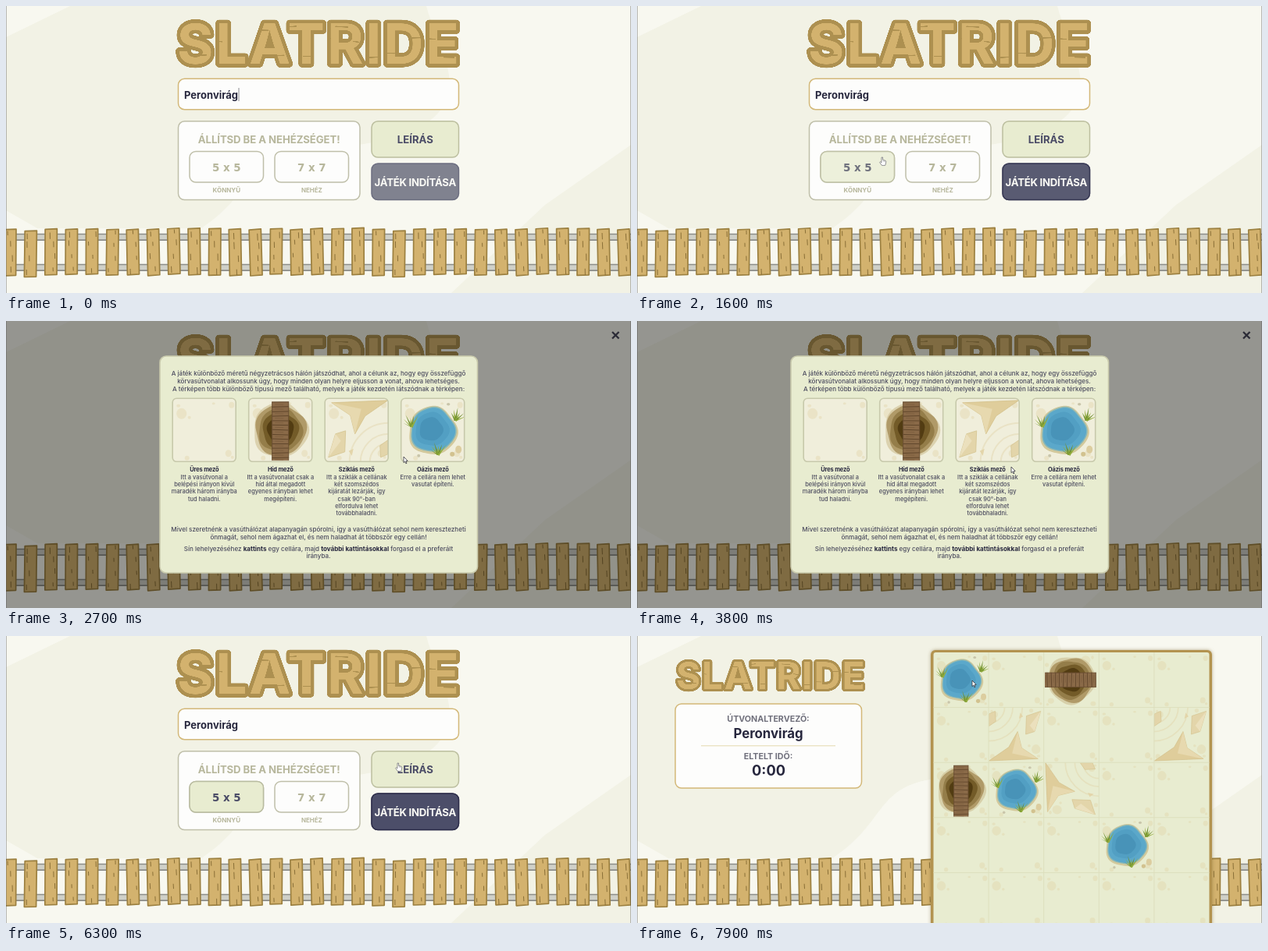
An HTML page with a canvas for the animation above (8 s loop, 800 by 368 pixels).

```html
<!DOCTYPE html>
<html lang="hu">
<head>
<meta charset="utf-8">
<title>Vasútépítő játék</title>
<style>
html, body { margin: 0; width: 100%; height: 100%; overflow: hidden; background: #f8f8f0; }
canvas { display: block; width: 100vw; height: 100vh; }
</style>
</head>
<body>
<canvas id="stage"></canvas>
<script>
const W = 800, H = 368, LOOP = 8000;
const SELECT = 1400, OPEN = 2700, CLOSE = 5400, START = 7100;
const TITLE = 'SLATRIDE', PLAYER = 'Peronvirág';
const SANS = 'Inter, "Open Sans", sans-serif';
const WIDE = '"DejaVu Sans", sans-serif';
const C = {
  light: '#f8f8f0', shade: '#f2f2e5', wood: '#d3b26e', bark: '#ad9050', rim: '#9c8040', grain: '#8a7038',
  white: '#fdfdfc', gold: '#d3b878', muted: '#b7b79c', edge: '#bfbfa9', sage: '#e8ecd0',
  navy: '#4a4b66', ink: '#26263d', body: '#4b4b5e'
};

const canvas = document.getElementById('stage');
const dpr = window.devicePixelRatio || 1;
canvas.width = W * dpr;
canvas.height = H * dpr;
const g = canvas.getContext('2d');

const ease = k => { k = Math.min(1, Math.max(0, k)); return k * k * (3 - 2 * k); };
const noise = n => { const v = Math.sin(n * 127.1 + 3.7) * 43758.5453; return v - Math.floor(v); };

function poly(points, fill, stroke, width = 1) {
  g.beginPath();
  points.forEach(([x, y]) => g.lineTo(x, y));
  g.closePath();
  if (fill) { g.fillStyle = fill; g.fill(); }
  if (stroke) { g.strokeStyle = stroke; g.lineWidth = width; g.stroke(); }
}

function line(x1, y1, x2, y2, color, width = 1, c = g) {
  c.beginPath();
  c.moveTo(x1, y1);
  c.lineTo(x2, y2);
  c.strokeStyle = color;
  c.lineWidth = width;
  c.stroke();
}

function box(x, y, w, h, r, fill, stroke, width = 1.5) {
  g.beginPath();
  g.roundRect(x, y, w, h, r);
  if (fill) { g.fillStyle = fill; g.fill(); }
  if (stroke) { g.strokeStyle = stroke; g.lineWidth = width; g.stroke(); }
}

function text(str, x, y, size, weight, color, align = 'center', gap = 0, family = SANS) {
  g.font = `${weight} ${size}px ${family}`;
  g.letterSpacing = gap + 'px';
  g.textAlign = align;
  g.fillStyle = color;
  g.fillText(str, x, y);
}

// Parts between asterisks are bold.
function richText(str, x, y, size) {
  const parts = str.split('*').map((s, i) => ({ s, weight: i % 2 ? 700 : 500 }));
  g.letterSpacing = '0px';
  let total = 0;
  for (const p of parts) {
    g.font = `${p.weight} ${size}px ${SANS}`;
    total += p.w = g.measureText(p.s).width;
  }
  let at = x - total / 2;
  for (const p of parts) {
    text(p.s, at, y, size, p.weight, p.weight > 500 ? C.ink : C.body, 'left');
    at += p.w;
  }
}

// Wooden title, drawn once and reused at two sizes.
const title = document.createElement('canvas');
title.width = 1200;
title.height = 240;
(() => {
  const c = title.getContext('2d');
  c.scale(3, 3);
  c.font = `700 71px ${SANS}`;
  c.letterSpacing = '2.8px';
  c.textAlign = 'center';
  c.lineJoin = 'round';
  c.lineWidth = 9.5;
  c.strokeStyle = C.bark;
  c.strokeText(TITLE, 201, 66);
  c.fillStyle = C.wood;
  c.fillText(TITLE, 201, 66);
  c.globalCompositeOperation = 'source-atop';
  c.lineCap = 'round';
  for (let i = 0; i < 18; i++) {
    const x = 24 + i * 19.6 + noise(i) * 6, y = 18 + noise(i + 40) * 45;
    line(x, y, x + 7 + noise(i + 80) * 10, y + noise(i + 9) * 2 - 1, C.bark, 1.4, c);
  }
})();

const drawTitle = (cx, cy, k) => g.drawImage(title, cx - 200 * k, cy - 40 * k, 400 * k, 80 * k);

function background() {
  g.fillStyle = C.light;
  g.fillRect(0, 0, W, H);
  g.fillStyle = C.shade;
  g.beginPath();
  g.moveTo(82, 0);
  g.lineTo(538, 0);
  g.bezierCurveTo(550, 45, 580, 85, 562, 125);
  g.bezierCurveTo(530, 180, 430, 180, 375, 184);
  g.bezierCurveTo(305, 196, 318, 240, 250, 285);
  g.lineTo(40, 285);
  g.lineTo(0, 262);
  g.lineTo(0, 40);
  g.fill();
  poly([[800, 178], [690, 255], [570, 368], [800, 368]], C.shade);
}

function plank(i) {
  const n = i % 18;
  const h = 58.5 + noise(n + 2) * 2;
  g.save();
  g.translate(5.2 + i * 26.2, 315.2 + (n === 1 ? 2.6 : noise(n + 20) * 1.6 - .8));
  g.rotate((noise(n + 60) - .5) * .05);
  g.lineJoin = 'round';
  poly([[-7.8, -h / 2 + .8], [7.4, -h / 2], [7.8, h / 2 - .8], [-7.4, h / 2]], C.wood, C.rim, 1.7);
  for (let k = 0; k < 4; k++) {
    const x = (noise(n * 5 + k) - .5) * 10;
    const y = [-28, -16, 1, 18][k] + noise(n + k * 7) * 4;
    line(x, y, x + .3, y + 5 + noise(n + k) * 4, C.grain, 1);
  }
  g.restore();
}

function track() {
  for (const y of [292.5, 331.5]) {
    g.fillStyle = '#cfd0c8';
    g.fillRect(0, y, W, 8);
    line(0, y, W, y, '#8c8d89', 1.6);
    line(0, y + 7.6, W, y + 7.6, '#8c8d89', 1.6);
  }
  for (let i = 0; i < 31; i++) plank(i);
}

function sizeButton(x, label, on) {
  box(x, 186.5, 94.5, 39.5, 8, C.white, C.edge);
  text(label, x + 47.3, 211.5, 13.4, 700, C.muted, 'center', 0, WIDE);
  if (!on) return;
  g.globalAlpha = on;
  box(x, 186.5, 94.5, 39.5, 8, C.sage, '#b9bca0');
  text(label, x + 47.3, 211.5, 13.4, 700, C.navy, 'center', 0, WIDE);
  g.globalAlpha = 1;
}

function menu(t) {
  const on = ease((t - SELECT) / 300);
  drawTitle(400, 48, 1);
  box(220.5, 93.3, 359, 39.4, 8, C.white, C.gold);
  text(PLAYER, 228, 118.5, 13, 700, C.ink, 'left');
  if (t < SELECT && t % 1000 < 500) line(298, 105, 298, 122, '#8a8a90', 1);

  box(220.5, 147.8, 232.5, 100.7, 8, C.white, C.edge);
  text('ÁLLÍTSD BE A NEHÉZSÉGET!', 336.7, 176, 13.2, 700, C.muted, 'center', -.08);
  sizeButton(235, '5 x 5', on);
  sizeButton(344, '7 x 7', 0);
  text('KÖNNYŰ', 282.3, 239.3, 8, 700, C.muted);
  text('NEHÉZ', 391.3, 239.3, 7.9, 700, C.muted);

  box(468, 147.8, 111.5, 46.2, 8, C.sage, '#bcbf9f');
  text('LEÍRÁS', 523.8, 176, 13.2, 700, C.navy);
  box(468, 202, 111.5, 46.5, 8, '#80828f', '#6c6e80');
  g.globalAlpha = on;
  box(468, 202, 111.5, 46.5, 8, '#4c4e69', '#2d2d4a');
  g.globalAlpha = 1;
  text('JÁTÉK INDÍTÁSA', 523.8, 230.7, 13.2, 700, '#fbfbf6', 'center', -.25);
}

// Uneven round shape around the tile centre.
function blob(r, fill, phase = 0, cx = 0, cy = 0) {
  const pts = [];
  for (let i = 0; i < 60; i++) {
    const a = i * Math.PI / 30;
    const k = r * (1 + .04 * Math.sin(3 * a + phase) + .03 * Math.sin(5 * a + 1 + phase));
    pts.push([cx + k * Math.cos(a), cy + k * Math.sin(a)]);
  }
  poly(pts, fill);
}

function dot(x, y, rx, ry, color) {
  g.beginPath();
  g.ellipse(x, y, rx, ry, 0, 0, 7);
  g.fillStyle = color;
  g.fill();
}

function plant(x, y, lean) {
  for (let i = 0; i < 6; i++) {
    const a = lean + (i - 2.5) * .33, len = 12 + (i % 3) * 2.5;
    const dx = Math.sin(a), dy = -Math.cos(a);
    poly([[x - 1.5, y], [x + dx * len, y + dy * len], [x + 1.5, y + .5]], i % 2 ? '#93ad3c' : '#6f8f2f');
  }
}

function sand() {
  const c = 'rgba(221,207,160,.36)';
  dot(-29, -21, 6.5, 7, c);
  dot(-33, -31, 2.5, 2, c);
  dot(-19, -16, 2, 2, c);
  dot(35, -32, 3.5, 4, c);
  dot(31, 30, 4, 4.5, c);
  dot(-22, 36, 3, 3, c);
  dot(36, 35, 2, 2, c);
  dot(12, -34, 2, 1.5, c);
}

const art = {
  empty() {},
  bridge() {
    blob(35, 'rgba(205,190,145,.6)', 1);
    blob(32.5, '#b09a68', 2);
    blob(28, '#947d49', .5);
    blob(23, '#735b28', 2);
    blob(17, '#523c12', 3);
    g.fillStyle = '#8a6a48';
    g.fillRect(-10.5, -36, 21, 75);
    for (let i = 0; i < 13; i++) {
      const y = -36 + i * 5.9;
      line(-11, y + noise(i), 11, y + noise(i + 5), '#60462b', 1);
      line(-7, y + 3, 4, y + 3.4, '#795b3c', .7);
    }
    line(-10.5, -36, -10.5, 39, '#6b4f33', 1);
    line(10.5, -36, 10.5, 39, '#6b4f33', 1);
  },
  rock() {
    for (const r of [50, 36, 24]) {
      g.beginPath();
      g.arc(41, 41, r, Math.PI, Math.PI * 1.5);
      g.strokeStyle = 'rgba(222,207,162,.4)';
      g.lineWidth = 2;
      g.stroke();
    }
    poly([[-32, -35], [40, -38], [11, -18], [-2, 5], [-8, -19]], '#dfcd9b', '#d3c08b', .8);
    poly([[-32, -35], [6, -27], [-2, 5], [-8, -19]], '#e7d9af');
    poly([[-27, 5], [-14, 1], [-15, 28], [-36, 35]], '#e3d5aa', '#d5c591', .8);
    poly([[-27, 5], [-20, 14], [-36, 35]], '#ebe0bd');
    poly([[30, 20], [40, 13], [40, 31], [31, 35]], '#e3d5aa', '#d5c591', .8);
    poly([[-10, 27], [-4, 24], [-6, 33]], '#e3d5aa');
  },
  oasis() {
    blob(31, '#d3c99c', .6, 0, 1);
    blob(29, '#8db8b4', .6);
    blob(27.5, '#5ba8ca', .6);
    blob(21.5, '#529fc3', .6, -1, -1);
    blob(15, '#4893b8', .6, -2, -1);
    plant(-27, -4, -.3);
    plant(29, -12, .35);
    plant(7, 32, -.15);
    dot(33, 25, 4, 5, '#dccd9f');
    dot(25, 31, 3, 3, '#d2c28f');
    dot(20, -33, 2.2, 1.8, '#c9c5aa');
    dot(-18, 33, 2, 2, '#c9c5aa');
  }
};

function tile(kind, x, y, size, turns = 0) {
  g.save();
  g.beginPath();
  g.rect(x, y, size, size);
  g.clip();
  g.translate(x + size / 2, y + size / 2);
  g.scale(size / 81, size / 81);
  g.rotate(turns * Math.PI / 2);
  sand();
  art[kind]();
  g.restore();
}

const fields = [
  ['empty', 'Üres mező', 'Itt a vasútvonal a|belépési irányon kívül|maradék három irányba|tud haladni.'],
  ['bridge', 'Híd mező', 'Itt a vasútvonalat csak a|híd által megadott|egyenes irányban lehet|megépíteni.'],
  ['rock', 'Sziklás mező', 'Itt a sziklák a cellának|két szomszédos|kijáratát lezárják, így|csak 90°-ban|elfordulva lehet|továbbhaladni.'],
  ['oasis', 'Oázis mező', 'Erre a cellára nem lehet|vasutat építeni.']
];
const notes = [
  [70, 'A játék különböző méretű négyzetrácsos hálón játszódhat, ahol a célunk az, hogy egy összefüggő'],
  [80, 'körvasútvonalat alkossunk úgy, hogy minden olyan helyre eljusson a vonat, ahova lehetséges.'],
  [90, 'A térképen több különböző típusú mező található, melyek a játék kezdetén látszódnak a térképen:'],
  [269.7, 'Mivel szeretnénk a vasúthálózat alapanyagán spórolni, így a vasúthálózat sehol nem keresztezheti'],
  [279.8, 'önmagát, sehol nem ágazhat el, és nem haladhat át többször egy cellán!'],
  [294.5, 'Sín lehelyezéséhez *kattints* egy cellára, majd *további kattintásokkal* forgasd el a preferált'],
  [304.3, 'irányba.']
];

function modal() {
  g.fillStyle = 'rgba(0,0,0,.4)';
  g.fillRect(0, 0, W, H);
  line(776, 14, 784.5, 22.5, '#2b2b36', 2.3);
  line(784.5, 14, 776, 22.5, '#2b2b36', 2.3);
  box(197, 45, 406.5, 278, 8, C.sage, '#c9caac', 1.6);
  for (const [y, s] of notes) richText(s, 400, y, 8.06);
  fields.forEach(([kind, name, info], i) => {
    const x = 213.2 + i * 97.5, cx = x + 40.6;
    box(x, 99.3, 81, 81, 5, '#f0eedb');
    tile(kind, x, 99.3, 81);
    box(x, 99.3, 81, 81, 5, null, '#c7c9ab', 1.6);
    text(name, cx, 193, 7.4, 700, C.ink, 'center', -.1);
    info.split('|').forEach((s, k) => text(s, cx, 202.6 + k * 9.35, 7.45, 500, C.body));
  });
}

// [column, row, kind, quarter turns]
const placed = [
  [0, 0, 'oasis', 0], [2, 0, 'bridge', 1], [1, 1, 'rock', 2], [4, 1, 'rock', 2],
  [0, 2, 'bridge', 0], [1, 2, 'oasis', 0], [2, 2, 'rock', 3], [3, 3, 'oasis', 0]
];

function game() {
  drawTitle(171, 50.5, .667);
  box(49, 87, 238.5, 108, 8, C.white, C.gold);
  text('ÚTVONALTERVEZŐ:', 168, 110, 10.7, 700, '#70707c');
  text(PLAYER, 168, 131, 16.8, 700, C.ink);
  line(82, 140.8, 254, 140.8, '#e3d9ad', 1);
  text('ELTELT IDŐ:', 168, 158.2, 10.7, 700, '#70707c');
  text('0:00', 168.5, 179.3, 18.2, 700, C.ink);

  g.save();
  g.shadowColor = 'rgba(120,95,40,.5)';
  g.shadowBlur = 4;
  box(376, 18, 360, 400, 6, '#b3934f');
  g.restore();
  box(379.5, 21, 353, 400, 3, C.sage);
  const s = 70.6, ox = 379.5, oy = 21;
  for (let r = 0; r < 5; r++) for (let c = 0; c < 5; c++) {
    const hit = placed.find(p => p[0] === c && p[1] === r);
    tile(hit ? hit[2] : 'empty', ox + c * s, oy + r * s, s, hit ? hit[3] : 0);
  }
  for (let i = 1; i < 5; i++) {
    line(ox + i * s, oy, ox + i * s, H, '#dddfbd', 1);
    line(ox, oy + i * s, ox + 5 * s, oy + i * s, '#dddfbd', 1);
  }
}

// Pointer path: time, x, y
const path = [
  [600, 300, 122], [1300, 314, 194], [1700, 314, 194], [2350, 509, 174], [2750, 509, 174],
  [3500, 479, 187], [4400, 479, 187], [5100, 779, 15], [5500, 779, 15], [6200, 502, 163],
  [6350, 502, 163], [6800, 522, 222], [7150, 522, 222], [7800, 429, 57], [LOOP, 429, 57]
];

function isHand(t, x, y) {
  const inside = (l, top, r, b) => x > l && x < r && y > top && y < b;
  if (t >= START) return false;
  if (t >= OPEN && t < CLOSE) return inside(770, 8, 790, 28);
  return inside(235, 186, 329, 226) || inside(344, 186, 438, 226) ||
    inside(468, 148, 580, 194) || inside(468, 202, 580, 249);
}

function pointer(t) {
  if (t < path[0][0]) return;
  const i = path.findIndex(p => p[0] > t);
  const a = path[i - 1], b = path[i];
  const k = ease((t - a[0]) / (b[0] - a[0]));
  const x = a[1] + (b[1] - a[1]) * k, y = a[2] + (b[2] - a[2]) * k;
  g.save();
  g.translate(x, y);
  g.lineJoin = 'round';
  if (isHand(t, x, y)) {
    poly([[-1, 0], [.5, 0], [.8, 3.6], [4, 4.2], [4.8, 5.2], [4.2, 9], [3.6, 10.4],
      [-.6, 10.4], [-3.4, 6.4], [-2.6, 5.6], [-1, 6.8]], '#fff', '#66666c', .7);
    line(1.8, 4.2, 1.8, 6, '#88888c', .5);
    line(3.2, 4.4, 3.2, 6, '#88888c', .5);
  } else {
    poly([[0, 0], [0, 7.6], [1.7, 6.1], [2.9, 8.8], [4, 8.3], [2.9, 5.6], [5.2, 5.4]], '#fff', '#33333b', .8);
  }
  g.restore();
}

function render(t) {
  g.setTransform(dpr, 0, 0, dpr, 0, 0);
  background();
  track();
  if (t < START) menu(t); else game();
  if (t >= OPEN && t < CLOSE) modal();
  g.fillStyle = 'rgba(90,90,90,.4)';
  g.fillRect(0, 0, 1, H);
  g.fillRect(W - 1, 0, 1, H);
  pointer(t);
}

const begin = performance.now();
function tick() {
  render((performance.now() - begin) % LOOP);
  requestAnimationFrame(tick);
}
tick();
</script>
</body>
</html>
```
